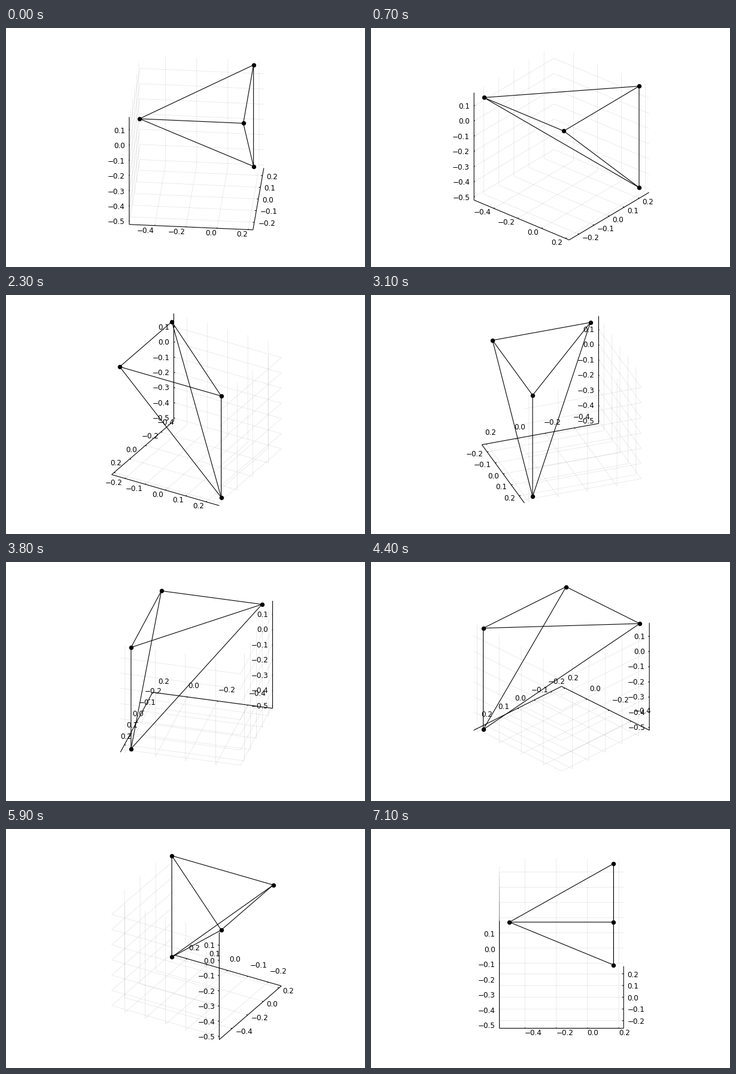
Recreate the animation shown at these times as a matplotlib script. Size 600 px wide and 400 px high, loop 7200 ms.

```python
import itertools

import matplotlib.pyplot as plt
import numpy as np
from matplotlib.animation import FuncAnimation
from matplotlib.collections import LineCollection

W, H, DPI = 600, 400, 100
PX = 72 / DPI                 # points per pixel
FRAMES, INTERVAL = 72, 100
SIDE = 207.6                  # box edge in pixels
CX, CY = 318.4, 191.7         # box centre on the stage
ELEV = np.radians(30)
PAD = 6.8                     # distance from tick to label

X, Y, Z = 0, 1, 2
LOW = np.array([-0.5642, -0.265, -0.52])
HIGH = np.array([0.2308, 0.265, 0.1867])
TICKS = {
    X: np.arange(-2, 2) / 5,
    Y: np.arange(-2, 3) / 10,
    Z: np.arange(-5, 2) / 10,
}

POINTS = np.array([
    (-1 / 2, -1 / 4, 1 / 6),
    (1 / 6, 1 / 4, 1 / 6),
    (1 / 6, 1 / 4, -1 / 2),
    (1 / 6, -1 / 4, 1 / 6),
])
EDGES = np.array([(POINTS[a], POINTS[b])
                  for a, b in itertools.combinations(range(4), 2)])


def project(pts, deg):
    """Orthographic view of data points from the given azimuth, in pixels."""
    p = (np.asarray(pts, float) - LOW) / (HIGH - LOW) - 0.5
    x, y, z = p[..., 0], p[..., 1], p[..., 2]
    c, s = np.cos(np.radians(deg)), np.sin(np.radians(deg))
    right = x * c + y * s
    up = (y * c - x * s) * np.sin(ELEV) + z * np.cos(ELEV)
    return np.stack([CX + SIDE * right, CY - SIDE * up], axis=-1)


def tick_path(axis, v):
    """Tick position on its axis, then the two bends of its grid line."""
    (x0, y0, z0), (x1, y1, z1) = LOW, HIGH
    if axis == X:
        return (v, y0, z0), (v, y1, z0), (v, y1, z1)
    if axis == Y:
        return (x1, v, z0), (x0, v, z0), (x0, v, z1)
    return (x0, y0, v), (x0, y1, v), (x1, y1, v)


def label_place(axis, deg):
    """Label offset from its tick, with the horizontal alignment."""
    if axis == Z:
        return -PAD - 0.3, 0.3, "right"
    c = round(np.cos(np.radians(deg)), 9)
    s = round(np.sin(np.radians(deg)), 9)
    side, down = (-s, c) if axis == X else (c, s)
    above = down < 0
    align = "right" if side < 0 and not above else "left"
    return PAD * side - 0.3, PAD * down + (-12.8 if above else 0.8), align


def number(v):
    return ("\u2212" if v < 0 else "") + f"{abs(v):.1f}"


(x0, y0, z0), (x1, y1, z1) = LOW, HIGH
AXES = np.array([
    [(x0, y0, z0), (x1, y0, z0)],
    [(x1, y0, z0), (x1, y1, z0)],
    [(x0, y0, z0), (x0, y0, z1)],
])
GRID = np.array([tick_path(a, v) for a in TICKS for v in TICKS[a]])
MARKS = np.stack([GRID[:, 0], GRID[:, 0] + 0.0125 * (GRID[:, 1] - GRID[:, 0])],
                 axis=1)
LABELS = [(a, number(v)) for a in TICKS for v in TICKS[a]]

fig = plt.figure(figsize=(W / DPI, H / DPI), dpi=DPI, facecolor="white")
ax = fig.add_axes([0, 0, 1, 1])
ax.set_xlim(0, W)
ax.set_ylim(H, 0)
ax.axis("off")


def add_lines(width, **style):
    lines = LineCollection([], linewidths=width * PX, colors="black", **style)
    lines.set_snap(False)
    ax.add_collection(lines, autolim=False)
    return lines


layers = [
    (add_lines(0.75, alpha=0.1), GRID),
    (add_lines(1.1), AXES),
    (add_lines(1.0), MARKS),
    (add_lines(1.1), EDGES),
]
dots, = ax.plot([], [], "o", color="black", ms=7.4 * PX, mew=0)
texts = [ax.text(0, 0, s, family="DejaVu Sans", size=12 * PX, va="baseline")
         for _, s in LABELS]


def draw(i):
    deg = 5 * (i + 1)
    for lines, shape in layers:
        lines.set_segments(project(shape, deg))
    dots.set_data(*project(POINTS, deg).T)
    anchors = project(GRID[:, 0], deg)
    for text, (axis, _), (x, y) in zip(texts, LABELS, anchors):
        dx, dy, align = label_place(axis, deg)
        text.set_position((x + dx, y + dy + 4.4))
        text.set_ha(align)
    return [lines for lines, _ in layers] + [dots] + texts


anim = FuncAnimation(fig, draw, frames=FRAMES, interval=INTERVAL,
                     repeat=True, repeat_delay=0)
plt.show()
```
